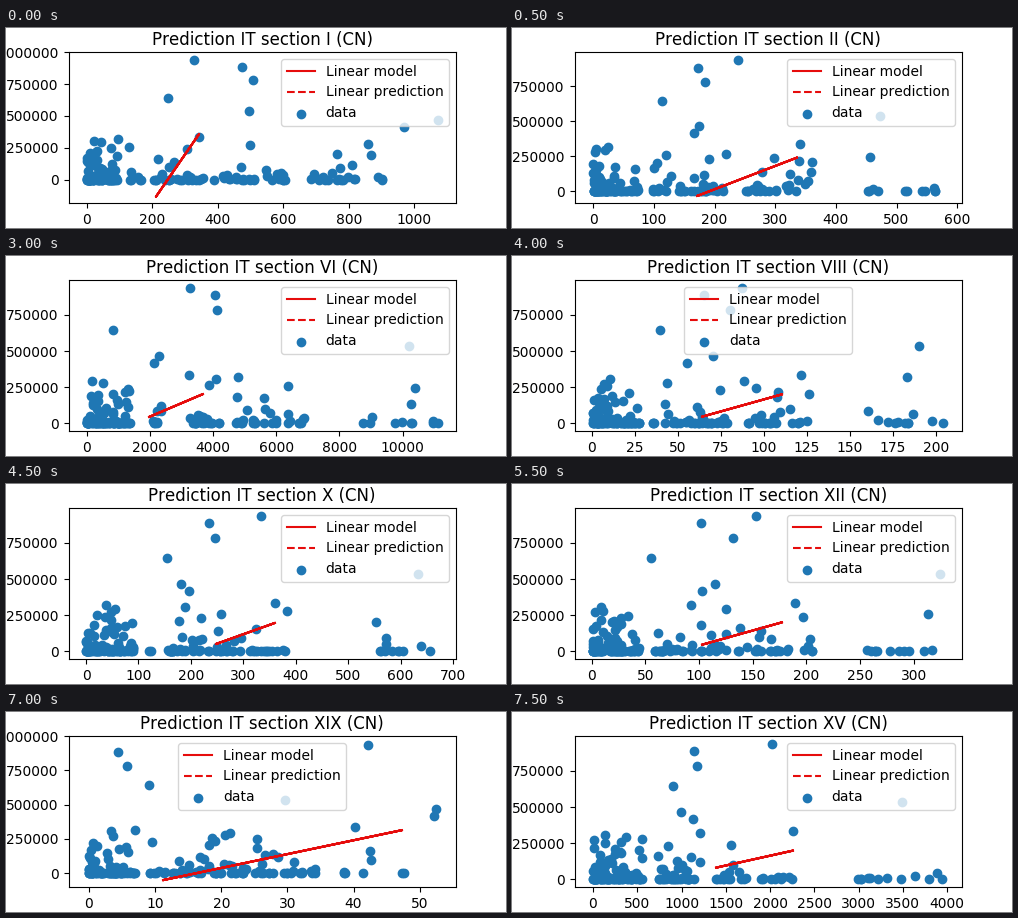
These frames come from a looping animation (500x200 px, 8 s). A matplotlib script:

```python
import matplotlib.pyplot as plt
import numpy as np
from matplotlib.animation import FuncAnimation
from matplotlib.ticker import MultipleLocator

plt.rcParams["text.kerning_factor"] = 6
RED = "#e60c0c"
LEFT, RIGHT = 62.5, 450.0  # axes edges in pixels

# Largest observations, in thousands; the others follow a steep power law
PEAKS = np.array([937, 885, 783, 643, 535, 465, 414, 335])
USUAL_PEAKS = (250, 205, 212, 155, 400, 190, 195, 275)
USUAL_BANDS = ((81, 127, 95), (140, 215, 40), (225, 300, 26), (350, 432, 12))
sections = []


def scatter_points(rng, peaks, bands):
    """Return pixel x and heights: named peaks plus random bands (lo, hi, count)."""
    xs = [np.asarray(peaks, float)]
    for i, (lo, hi, n) in enumerate(bands):
        skew = 1.6 if i == 0 else 1  # crowd the first band towards zero
        xs.append(lo + (hi - lo) * rng.random(n) ** skew)
    total = sum(n for *_, n in bands)
    tail = 340 * np.linspace(0, 0.99, total) ** 7
    return np.concatenate(xs), np.concatenate([PEAKS, rng.permutation(tail)])


def add(name, xlim, step, start=(190, 45), end=(270, 200), peaks=None,
        bands=USUAL_BANDS, top=992, loc="upper right"):
    """Describe a section; x in pixels, heights in thousands."""
    rng = np.random.default_rng(len(sections) + 7)
    if peaks is None:
        peaks = np.array(USUAL_PEAKS) + rng.normal(0, 14, len(PEAKS))
    x, h = scatter_points(rng, peaks, bands)
    bottom = start[1] - 50 if start[1] < 0 else -54
    sections.append(dict(name=name, xlim=xlim, ylim=(bottom, top), step=step,
                         line=np.array([start, end]).T, x=x, h=h, loc=loc))


add("I", (-55.9, 1127.7), 200, (150, -134), (193, 357),
    (188, 236, 247, 162, 243, 432, 398, 193),
    ((81, 112, 92), (123, 200, 32), (203, 281, 28), (303, 350, 18), (361, 385, 5)),
    top=1002)
add("II", (-31, 608), 100, (185, -35), (285, 240), top=996)
add("III", (-27, 560), 100)
add("IV", (-100.7, 2013), 250, (283, -27), (347, 452),
    (330, 369, 409, 175, 311, 217, 235, 347),
    ((81, 104, 72), (110, 141, 26), (158, 219, 40), (284, 315, 22), (341, 432, 15)),
    top=1002, loc="upper left")
add("IX", (-100, 2008), 250, (200, -35), (300, 230), top=996)
add("V", (-1020, 20280), 5000)
add("VI", (-580, 11690), 2000, (143, 43), (197, 202),
    (184, 209, 211, 107, 403, 153, 148, 183),
    ((81, 124, 95), (144, 158, 9), (177, 214, 22), (228, 300, 30), (357, 432, 12)))
add("VII", (-75.7, 1510), 200, (195, -30), (280, 240), top=996)
add("VIII", (-10, 215), 25, loc="upper center")
add("X", (-33.4, 705.7), 100, (210, 50), (269, 196),
    (255, 203, 209, 161, 412, 175, 183, 269),
    ((80, 128, 98), (141, 215, 40), (216, 285, 25), (369, 432, 12)))
add("XI", (-100, 2008), 250)
add("XII", (-16, 345), 50)
add("XIII", (-39.7, 770.5), 100, (205, -41), (312, 247),
    (301, 188, 196, 155, 419, 250, 247, 303),
    ((81, 135, 98), (136, 200, 38), (205, 313, 24), (348, 432, 14)), top=996.5)
add("XIV", (-13, 270), 50, (190, -30), (300, 220), top=996, loc="upper center")
add("XIX", (-3.1, 55.5), 10, (157, -51), (396, 314),
    (362, 112, 121, 143, 279, 430, 428, 349),
    ((83, 130, 88), (143, 230, 45), (235, 311, 32), (337, 404, 8)),
    top=1001, loc="upper center")
add("XV", (-208.7, 4168), 500, (204, 80), (281, 198),
    (260, 182, 185, 161, 390, 169, 181, 281),
    ((81, 131, 98), (145, 188, 38), (201, 280, 26), (343, 432, 12)))

fig, ax = plt.subplots(figsize=(5, 2), dpi=100)
fig.subplots_adjust(left=0.125, right=0.9, bottom=0.125, top=0.88)


def draw(i):
    s = sections[i]
    x0, x1 = s["xlim"]

    def to_x(px):
        return x0 + (px - LEFT) / (RIGHT - LEFT) * (x1 - x0)

    ax.clear()
    px, h = s["line"]
    lx, ly = np.tile(to_x(px), 2), np.tile(h, 2) * 1000  # retraced line
    ax.plot(lx, ly, "-", color=RED, label="Linear model")
    ax.plot(lx, ly, "--", color=RED, label="Linear prediction")
    ax.scatter(to_x(s["x"]), s["h"] * 1000, label="data")

    ax.set_xlim(x0, x1)
    ax.set_ylim(*(1000 * y for y in s["ylim"]))
    ax.xaxis.set_major_locator(MultipleLocator(s["step"]))
    ax.yaxis.set_major_locator(MultipleLocator(250000))
    ax.ticklabel_format(style="plain")
    ax.set_title(f"Prediction IT section {s['name']} (CN)", pad=5.3)
    ax.legend(loc=s["loc"])
    return []


anim = FuncAnimation(fig, draw, frames=len(sections), init_func=lambda: [],
                     interval=500, repeat=True, repeat_delay=0)
plt.show()
```
